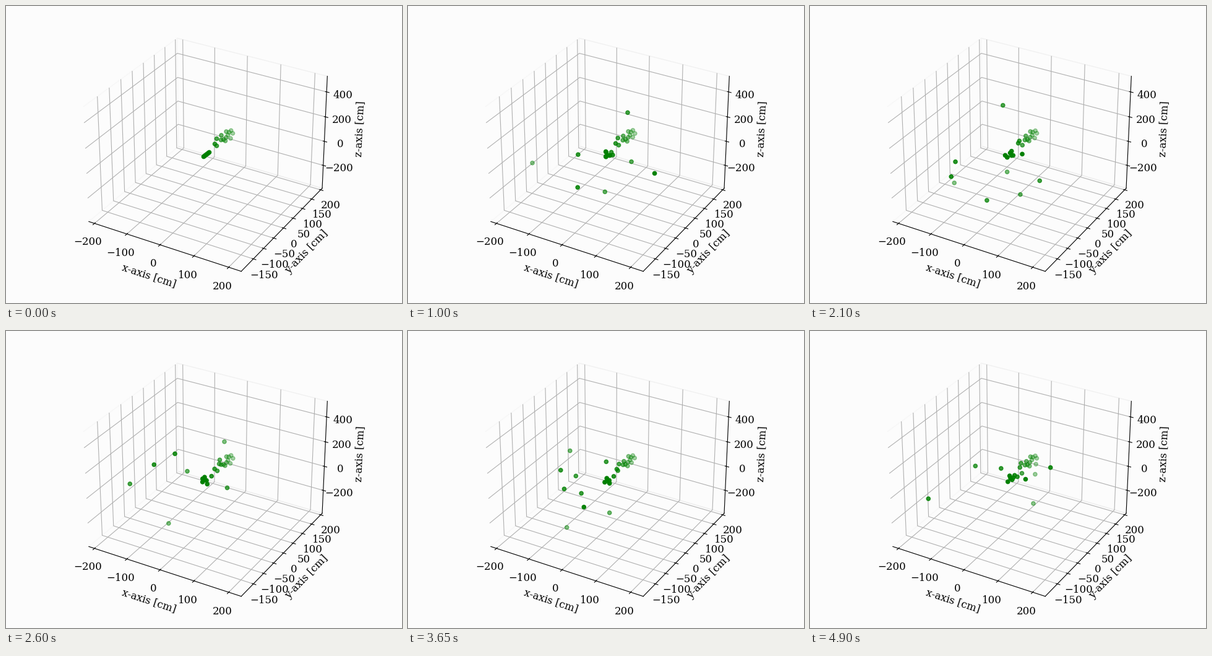
Write a matplotlib script that moves like this. It is 640 by 480 pixels and loops after 4950 ms.

```python
import numpy as np
import matplotlib.pyplot as plt
from matplotlib.animation import FuncAnimation

W, H, DPI = 640, 480, 100
FRAMES, STEP_MS = 99, 50
BACK = "#fcfcfc"
GREEN = (0, 128 / 255, 0)
SEED = 700

plt.rcParams.update({
    "font.family": "DejaVu Serif",
    "font.size": 12,
    "figure.facecolor": BACK,
    "axes.facecolor": BACK,
})

# Resting track in stage pixels: a still far cluster, then a loose chain.
CLUSTER = np.array([(363.2, 200.8), (355.5, 202.5), (360, 203.5),
                    (366, 205.3), (358.2, 208), (355.2, 212),
                    (347, 216), (351, 215.5), (354, 217.5)])
CHAIN = np.array([(347.5, 208.5), (362.5, 213.5), (340, 214),
                  (337, 222.5), (340, 225.5)])
TAIL = np.linspace((328, 236), (319, 243), 7)
TRACK = np.vstack([CLUSTER, CHAIN, TAIL])

# How far each part of the track shakes, in pixels.
SHAKE = np.repeat([.3, 1.5, 3.8], [len(CLUSTER), len(CHAIN), len(TAIL)])


def track_alpha(x):
    """The track runs away from the viewer, fading to the right."""
    return np.clip(1 - .0165 * (x - 322), .35, 1)


def strays(rng):
    """A few points thrown far off the track, at random depths."""
    count = rng.integers(7, 10)
    x = np.clip(rng.normal(315, 50, count), 190, 425)
    y = np.clip(rng.normal(242, 40, count), 160, 332)
    return np.column_stack([x, y, rng.uniform(.38, 1, count)])


def points(i):
    """Rows of x, y and opacity, far ones first; the loop starts at rest."""
    rng = np.random.default_rng(SEED + i)
    track = TRACK.copy()
    if i > 0:
        track += rng.normal(size=TRACK.shape) * SHAKE[:, None]
    pts = np.column_stack([track, track_alpha(track[:, 0])])
    if i > 0:
        pts = np.vstack([pts, strays(rng)])
    return pts[np.argsort(pts[:, 2], kind="stable")]


fig = plt.figure(figsize=(W / DPI, H / DPI), dpi=DPI)

# Square 3D box, centred across the stage.
TOP, SIDE = 18, 438.5
ax = fig.add_axes([.5 - SIDE / 2 / W, 1 - (TOP + SIDE) / H,
                   SIDE / W, SIDE / H], projection="3d")
ax.view_init(elev=30, azim=-60)
ax.set(xlim=(-217.7, 235.5), ylim=(-207.8, 208.8), zlim=(-394, 524),
       xticks=range(-200, 201, 100), yticks=range(-150, 201, 50),
       zticks=range(-200, 401, 200),
       xlabel="x-axis [cm]", ylabel="y-axis [cm]", zlabel="z-axis [cm]")
for axis in (ax.xaxis, ax.yaxis, ax.zaxis):
    axis.pane.set_fill(False)

# Flat layer in stage pixels for the dots.
layer = fig.add_axes([0, 0, 1, 1])
layer.set(xlim=(0, W), ylim=(H, 0))
layer.axis("off")
dots = layer.scatter([], [], s=20, linewidths=1)


def draw(i):
    pts = points(i)
    rgba = [(*GREEN, alpha) for alpha in pts[:, 2]]
    dots.set_offsets(pts[:, :2] + .5)
    dots.set_facecolor(rgba)
    dots.set_edgecolor(rgba)
    return [dots]


anim = FuncAnimation(fig, draw, frames=FRAMES, interval=STEP_MS,
                     init_func=lambda: draw(0), repeat=True)
plt.show()
```
